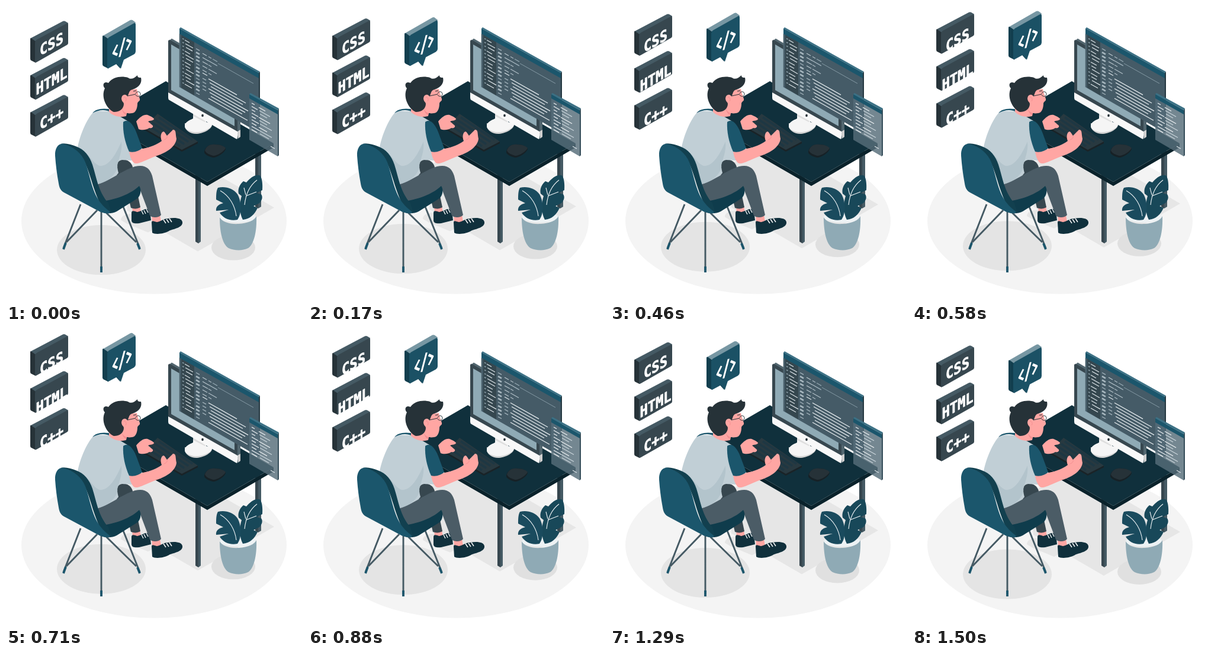
Write an HTML page with a canvas that moves like this. It is 500 px wide and 500 px high and loops after 1.54 s.

```html
<!DOCTYPE html>
<html lang="en">
<head>
<meta charset="utf-8">
<title>Programmer at a desk</title>
<style>
html, body { margin: 0; width: 100%; height: 100%; overflow: hidden; background: #fff; }
canvas { display: block; width: 500px; height: 500px; }
</style>
</head>
<body>
<canvas id="stage"></canvas>
<script>
const LOOP = 1540, RISE = 20, DRIFT = 0.45, LEAD = 35;
const NAVY = '#1b566c', DEEP = '#10303c', INK = '#263238', SLATE = '#37474f',
      STEEL = '#455a64', SKIN = '#ffa6a3', SHIRT = '#c1cfd6', MIST = '#8faab5';

const canvas = document.getElementById('stage');
const ratio = window.devicePixelRatio || 1;
canvas.width = canvas.height = Math.round(500 * ratio);
const ctx = canvas.getContext('2d');

function fill(color, d) {
  ctx.fillStyle = color;
  ctx.fill(new Path2D(d));
}

function line(color, width, d) {
  ctx.strokeStyle = color;
  ctx.lineWidth = width;
  ctx.stroke(new Path2D(d));
}

function oval(color, x, y, rx, ry, turn = 0) {
  ctx.fillStyle = color;
  ctx.beginPath();
  ctx.ellipse(x, y, rx, ry, turn, 0, Math.PI * 2);
  ctx.fill();
}

function slant(x, y, length, color, width = 1.2) {
  line(color, width, `M${x} ${y}l${length} ${length * 0.565}`);
}

// Draws in the plane of the faces that point to the front left.
function onFace(x, y, draw) {
  ctx.save();
  ctx.transform(0.866, -0.5, 0, 1, x, y);
  draw();
  ctx.restore();
}

function floor(lift) {
  oval('#f4f4f4', 250, 363, 224, 123.5);
  ctx.save();
  ctx.translate(0, -lift * DRIFT);
  fill('#e6e6e6', 'M205 346L324 415L453 341L270 235L200 275Z');
  fill('#e6e6e6', 'M194 362C194 353 208 350 220 352L260 372L240 383L204 368Z');
  oval('#e4e4e4', 161, 412.5, 75, 42);
  oval('#e0e0e0', 384, 408.5, 37, 21.5);
  ctx.restore();
}

function desk() {
  fill(SLATE, 'M421 245h5v97l-5-3Z');
  fill(STEEL, 'M426 245h5v94l-5 3Z');
  fill(SLATE, 'M320 285h5v116l-5-3Z');
  fill(STEEL, 'M325 285h4v113l-4 3Z');
  fill('#0a222b', 'M158 192L340 297L452 232V239L340 304L158 199Z');
  fill(DEEP, 'M270 127L452 232L340 297L158 192Z');

  fill('#1a2327', 'M233 206V209L297 246L324 232V229Z');
  fill('#283940', 'M256 182L324 229L297 243L233 206Z');
  for (let row = 0; row < 4; row++) {
    line('#1e3743', 3.6, `M${258 - row * 6} ${188 + row * 4.3}l${57 - row} ${38 - row * 0.7}`);
  }

  fill('#172126', 'M335 247C335 240 342 234 349 234C360 233 369 237 371 241C371 246 358 256 350 256C344 255 335 251 335 247Z');
  fill('#263238', 'M336 244C338 237 345 233 353 234C362 234 369 237 371 240C368 246 357 253 350 253C344 251 338 249 336 244Z');
}

function monitor() {
  fill('#d3d3d3', 'M302 203C302 210 313 217 323 216C335 215 348 207 348 201V198H302Z');
  fill('#f5f5f5', 'M302 203C302 196 310 193 316 190V180L338 190V196C344 197 348 198 348 201C346 207 333 213 323 213C313 214 302 209 302 203Z');
  fill('#dedede', 'M316 181L338 191L336 196L316 186Z');
  fill('#d0d0d0', 'M390 212L396 208V221L392 224Z');
  fill('#f8f8f8', 'M274 143L391 210V223Q391 226 388 224L276 159Q274 158 274 155Z');
  fill('#52666f', 'M275 59L280 55L396 123V209L391 212Z');
  fill(SLATE, 'M274 59Q275 56 278 58L388 121Q391 123 391 126V212L274 146Z');
  fill(MIST, 'M279 65L386 127V203L279 142Z');
  oval(INK, 332, 185, 1.8, 2.2);
}

function codeWindow() {
  fill('#455b67', 'M293 38L427 113V214L293 137Z');
  fill('#35474f', 'M296 48L318 60V151L296 138Z');
  fill(NAVY, 'M293 38L427 113V122L293 47Z');
  fill('#3c7185', 'M293 38L295 36L429 111L427 113Z');
  fill('#243740', 'M427 113L429 111V212L427 214Z');
  line('#5f747f', 0.8, 'M293 47V137');

  for (let row = 0; row < 13; row++) {
    const y = 55 + row * 6.2;
    slant(298, y, 2.5, '#8fa3ad', 1.6);
    slant(302 + row % 3, y + 2.5, 8 + row * 5 % 7, '#dce4e8');
    slant(321, y + 17, 6, '#a7b7bf', row % 4 ? 2.6 : 1.2);
  }
  for (let row = 0; row < 5; row++) {
    const y = 80 + row * 7;
    slant(332, y, 7 + row * 3 % 4, '#b8c5cc');
    slant(342, y + 5.6, row % 2 ? 14 : 5, '#aebdc5');
    if (row < 2) slant(349, y + 9.6, 8, '#91a5af');
  }
  slant(358, 97, 60, '#8499a4', 1);
  slant(332, 113, 8, '#dce4e8');
  for (let row = 0; row < 7; row++) {
    const x = 342 + row % 3 * 2;
    slant(x, 123 + row * 5.5 + row % 3, 48 + row * 13 % 20, '#e5ebee', 1.3);
    if (row < 4) slant(332, 122 + row * 6, 6, '#a7b7bf');
  }

  ctx.globalAlpha = 0.82;
  fill('#566d79', 'M411 149L459 176V254L411 226Z');
  ctx.globalAlpha = 1;
  fill(NAVY, 'M411 149L459 176V183L411 156Z');
  fill('#3c7185', 'M411 149L413 147L461 173L459 176Z');
  fill('#344d59', 'M459 176L461 173V252L459 254Z');
  for (let row = 0; row < 9; row++) {
    const y = 164 + row * 5.6;
    slant(415, y, 5 + row * 5 % 9, '#eef2f4');
    slant(427 + row % 3, y + 7.2, 11 + row * 7 % 13, row % 3 ? '#cbd6dc' : '#eef2f4');
  }
  slant(447, 237, 7, '#dce4e8');
}

function plant() {
  oval('#edf2f4', 392, 357, 31, 9);
  fill('#184859', 'M428 286C420 284 412 291 406 298L401 296C395 301 391 309 393 317L398 321C394 333 394 350 400 361C412 360 420 352 425 341L418 338L428 333C433 328 434 322 431 318L423 316L433 311C434 300 432 287 428 286Z');
  fill('#1a4b5e', 'M358 307C370 304 384 308 391 318C398 330 399 350 391 361C378 364 366 358 361 349L376 344L355 346C354 340 358 335 367 333L355 327C355 320 355 312 358 307Z');
  line('#eef3f5', 1.1, 'M362 312C378 321 387 338 389 355');
  line('#eef3f5', 1.1, 'M424 294C412 303 405 317 403 336M405 319L402 307M405 321L423 314');
  fill(MIST, 'M361 357C365 365 379 369 393 368C409 367 420 362 423 355C424 380 419 403 409 409C399 414 385 413 376 409C365 402 361 380 361 357Z');
}

function chairLegs() {
  line(STEEL, 2.9, 'M126 335L97 409M102 399L154 345M198 339L226 409M220 399L168 348M161 347V446');
  line(NAVY, 3.8, 'M101 400L97 411M222 401L226 411M161 440V450');
}

function legs() {
  fill(SKIN, 'M213 338L226 338L228 349L214 351Z');
  fill(DEEP, 'M212 350C212 344 217 347 222 348L231 345C236 342 241 342 243 345L245 362L225 367C218 368 212 367 212 362Z');
  line('#fff', 1.3, 'M229 346l3 6M233 345l3 6M237 343l3 6');
  fill(SLATE, 'M205 316L222 316L227 340C222 343 216 343 211 341Z');
  fill(SLATE, 'M187 262C197 256 211 260 214 272L208 295L187 300Z');

  fill(SKIN, 'M246 351L260 353L262 364C258 369 250 368 247 366Z');
  fill(DEEP, 'M246 366C246 361 250 364 255 365C261 364 266 359 274 359C285 357 297 358 298 365C299 373 287 376 277 379C266 386 251 386 247 383Z');
  line('#fff', 1.4, 'M266 361l4 6M271 360l4 6M276 359l4 6');
}

function torso() {
  fill(SHIRT, 'M151 177C139 184 124 218 120 244C136 260 146 290 156 304C174 302 182 292 190 282C186 268 188 261 196 260L214 261L205 194L178 178Z');
  fill('#b3c4cc', 'M121 241C138 242 144 265 158 270C174 272 187 248 195 229C197 245 190 260 188 268C190 278 178 294 157 302C147 290 137 255 120 244Z');
  fill(NAVY, 'M146 181C150 175 160 172 174 174L176 179C166 174 156 176 146 181Z');
  fill('#4b5c66', 'M152 302C172 298 195 278 218 271C235 267 243 274 247 287L262 353C258 358 247 358 243 354L226 309C214 320 190 327 166 336Z');
}

function chairShell() {
  fill('#0f3c4c', 'M155 331C176 329 207 321 225 304C229 309 228 320 222 325L187 347C177 352 164 351 155 345Z');
  fill('#12404f', 'M92 233C100 231 110 234 118 237C132 242 141 253 146 268C153 290 156 314 173 333L178 349L165 345C147 315 144 285 132 262C124 246 110 236 92 233Z');
  fill(NAVY, 'M83 253C82 240 89 231 97 233C115 238 128 249 134 264C143 289 145 316 162 335C168 343 178 347 175 350C168 351 161 349 154 345L98 315C91 311 90 305 89 300C86 284 84 268 83 253Z');
}

function head() {
  fill(SKIN, 'M174 172L206 142L221 140C222 145 224 150 226 157C227 161 222 161 222 165C222 172 219 181 213 181C208 182 204 181 204 181L203 186C193 189 181 186 174 179Z');
  fill('#f28e90', 'M204 181C199 180 197 176 196 174C197 180 200 183 203 184Z');
  fill(INK, 'M167 139C162 134 165 126 173 130C181 119 196 118 206 121C211 125 217 122 222 117C222 121 225 121 228 121C230 129 226 137 214 141C207 142 208 149 205 153C202 151 199 151 196 157L199 165C199 173 193 179 182 179C169 173 160 153 167 139Z');
  oval(SKIN, 201, 157, 5.8, 7.3, -0.25);
  line('#f28e90', 1, 'M199 154C203 154 204 158 202 161');
  line(INK, 1, 'M205 152L219 149M219 148C221 143 227 144 227 149C227 153 221 154 219 150');
  line(INK, 1.2, 'M215 144l5-1');
}

function arms() {
  fill(SKIN, 'M220 195C226 188 232 183 239 184C244 186 250 189 250 191C249 194 244 193 240 195L248 202C249 205 246 207 242 206C237 210 228 210 224 208Z');
  fill(SKIN, 'M208 246L231 241C243 239 255 234 263 228C260 220 262 213 266 212C269 213 270 217 272 219L282 209C288 208 286 217 288 224C287 237 272 248 252 254C236 260 222 269 216 265C211 260 209 252 208 246Z');
  line('#f28e90', 0.9, 'M272 219C273 223 270 225 267 226');
  fill(NAVY, 'M198 196C206 190 214 198 220 213L230 240C225 245 216 248 208 246C201 231 197 212 198 196Z');
}

function tag(label, y, lift) {
  ctx.save();
  ctx.translate(0, y - lift);
  fill(STEEL, 'M41 29L96 0Q98-1 100 0L105 3L104 8L49 36Z');
  fill(INK, 'M41 30Q41 28 43 29L50 34V70L42 66Q41 65 41 63Z');
  fill(SLATE, 'M49 36Q49 33 52 31L102 4Q105 2 105 6V37Q105 39 103 40L52 69Q49 71 49 68Z');
  ctx.restore();

  onFace(77, y + 37.3 - lift * DRIFT, () => {
    ctx.font = 'bold 25.5px "DejaVu Sans Mono", monospace';
    ctx.textAlign = 'center';
    ctx.fillStyle = ctx.strokeStyle = '#fff';
    ctx.lineWidth = 0.8;
    ctx.fillText(label, 0, 9.3);
    ctx.strokeText(label, 0, 9.3);
  });
}

function bubble(lift) {
  ctx.save();
  ctx.translate(0, 0.8 - lift);
  fill('#7797a3', 'M163 51L210 24Q213 23 215 25L219 28L216 34L171 57Z');
  fill('#123e4e', 'M163 52Q163 49 166 51L173 56V106L165 102Q163 101 163 99Z');
  fill('#123e4e', 'M185 97L193 106L190 94Z');
  fill('#1b5165', 'M171 58Q171 55 174 53L215 30Q219 27 219 32V77Q219 80 216 82L199 91L194 106L187 98L174 105Q171 107 171 103Z');
  onFace(196, 70, () => {
    line('#fff', 3.8, 'M-9-9L-17 1L-9 8M5-14L-5 14M9-8L17-1L9 9');
  });
  ctx.restore();
}

function draw(time) {
  const phase = ((time + LEAD) % LOOP) / LOOP;
  const lift = RISE * (1 - Math.abs(1 - 2 * phase));

  ctx.setTransform(ratio, 0, 0, ratio, 0, 0);
  ctx.fillStyle = '#fff';
  ctx.fillRect(0, 0, 500, 500);
  ctx.lineJoin = 'round';

  floor(lift);
  desk();
  monitor();
  codeWindow();
  plant();
  chairLegs();
  legs();
  torso();
  chairShell();
  head();
  arms();
  ['CSS', 'HTML', 'C++'].forEach((label, i) => tag(label, 26.8 + i * 62.5, lift));
  bubble(lift);
}

const start = performance.now();
function tick() {
  draw(performance.now() - start);
  requestAnimationFrame(tick);
}
tick();
</script>
</body>
</html>
```
